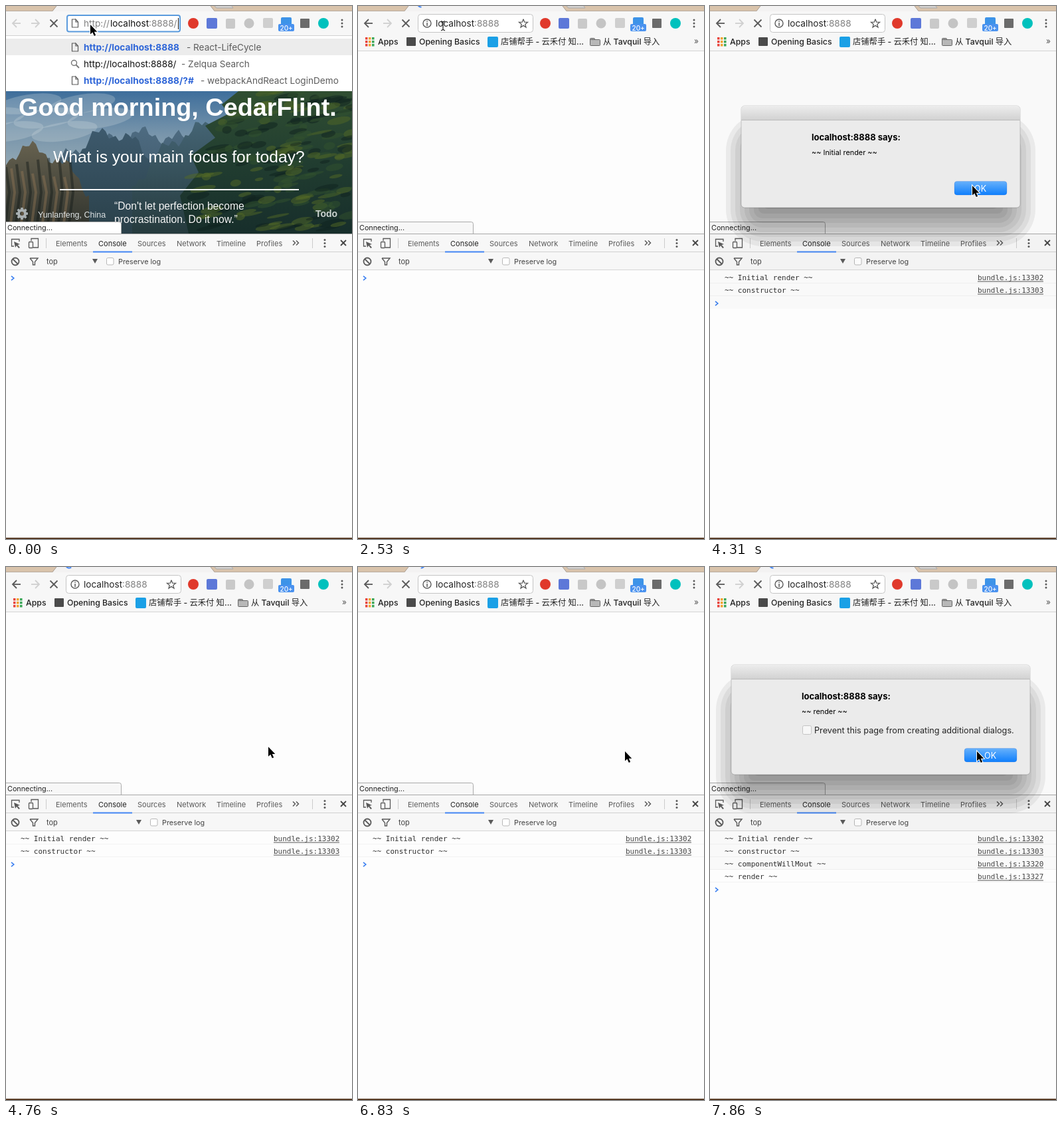
These frames come from a looping animation (521 by 801 pixels, 8000 ms). An HTML page with a canvas:

```html
<!DOCTYPE html>
<html lang="en">
<head>
<meta charset="utf-8">
<title>Lifecycle log</title>
<style>
html, body { margin: 0; width: 100%; height: 100%; overflow: hidden; background: #fdfdfd; }
canvas { display: block; width: 521px; height: 801px; }
</style>
</head>
<body>
<canvas id="stage" width="521" height="801"></canvas>
<script>
const ctx = document.getElementById('stage').getContext('2d');
const LOOP = 8000, STEP = 148.15, LOAD = 2522;
const UI = 'Inter, "Noto Sans CJK SC", "Noto Sans CJK", sans-serif';
const HERO = '"Liberation Sans", Arial, sans-serif';
const MONO = '"DejaVu Sans Mono", monospace';
const GREY = '#5a5a5a', BLUE = '#2f66d8';

const LOGS = [
  ['~~ Initial render ~~', 13302, 2], ['~~ constructor ~~', 13303, 2],
  ['~~ componentWillMout ~~', 13320, 30], ['~~ render ~~', 13327, 35]
];
const ALERTS = [
  { from: 3, to: 14, log: 0 }, { from: 16, to: 28, log: 1 },
  { from: 30, to: 33, log: 2 }, { from: 35, to: 99, log: 3 }
];
// Pointer path: step, x, y
const POINTER = [
  [5, 127, 28], [6, 150, 50], [7, 230, 120], [8, 330, 210], [9, 420, 288],
  [10, 459, 311], [11, 424, 289], [12, 395, 270], [21, 395, 271], [27, 402, 277]
];

function rect(x, y, w, h, fill) { ctx.fillStyle = fill; ctx.fillRect(x, y, w, h); }
function box(x, y, w, h, r, fill, stroke, width = 1) {
  ctx.beginPath();
  ctx.roundRect(x, y, w, h, r);
  if (fill) { ctx.fillStyle = fill; ctx.fill(); }
  if (stroke) { ctx.strokeStyle = stroke; ctx.lineWidth = width; ctx.stroke(); }
}
function dot(x, y, r, fill) { ctx.fillStyle = fill; ctx.beginPath(); ctx.arc(x, y, r, 0, 7); ctx.fill(); }
function ring(x, y, r, stroke, width) {
  ctx.strokeStyle = stroke; ctx.lineWidth = width;
  ctx.beginPath(); ctx.arc(x, y, r, 0, 7); ctx.stroke();
}
function trace(points) {
  ctx.beginPath();
  for (let i = 0; i < points.length; i += 2) ctx.lineTo(points[i], points[i + 1]);
}
function poly(fill, ...points) { trace(points); ctx.fillStyle = fill; ctx.fill(); }
function line(stroke, width, ...points) {
  trace(points); ctx.strokeStyle = stroke; ctx.lineWidth = width; ctx.stroke();
}
function text(str, x, y, size, fill, weight = 400, family = UI) {
  ctx.font = `${weight} ${size}px ${family}`;
  ctx.fillStyle = fill;
  ctx.fillText(str, x, y);
}
function shade(y, h, ...colors) {
  const g = ctx.createLinearGradient(0, y, 0, y + h);
  colors.forEach((c, i) => g.addColorStop(i / (colors.length - 1), c));
  return g;
}
function cross(x, y, r, color) {
  line(color, 1.8, x - r, y - r, x + r, y + r);
  line(color, 1.8, x + r, y - r, x - r, y + r);
}
function menuDots(x, y) { for (const d of [-5, 0, 5]) dot(x, y + d, 1.5, GREY); }
function fileIcon(x, y) {
  line(GREY, 1.2, x + 5.5, y, x, y, x, y + 12, x + 9, y + 12, x + 9, y + 4, x + 5.5, y, x + 5.5, y + 4, x + 9, y + 4);
}
function arrow(x, dir, color) {
  line(color, 1.8, x - 6 * dir, 26, x + 6 * dir, 26);
  line(color, 1.8, x, 20, x + 6 * dir, 26, x, 32);
}

function drawTabs(step) {
  rect(0, 0, 521, 8, '#d9c3ab');
  rect(0, 7, 521, 1, '#b9aca0');
  poly('#f3f2f2', 76, 0, 70, 8, 314, 8, 308, 0);
  line('#a99d92', 1, 76, 0, 70, 7.5);
  line('#a99d92', 1, 308, 0, 314, 7.5);
  poly('#d3d0ce', 314, 0, 317, 3, 342, 3, 340, 0);
  line('#aaa', 1, 314, 0, 317, 3, 342, 3, 340, 0);
  if (step < 0) return;
  const a = (85 + step * 70) * Math.PI / 180;
  ctx.strokeStyle = '#4285f4'; ctx.lineWidth = 2;
  ctx.beginPath(); ctx.arc(95, -4, 5.5, a, a + 2.4); ctx.stroke();
}

function drawToolbar(loaded) {
  rect(0, 8, 521, 36, '#f7f7f7');
  arrow(16, -1, loaded ? GREY : '#d0d0d0');
  arrow(44, 1, '#d0d0d0');
  cross(72, 26, 5.5, GREY);
  dot(282, 26, 8, '#e0392b');
  box(302, 18, 16, 16, 2, '#5d78d8');
  box(331, 19, 14, 15, 2, '#c9c9c9');
  dot(366, 26, 7.5, '#c4c4c4');
  box(387, 18, 15, 15, 2, '#cfcfcf');
  box(414, 17, 16, 12, 2, '#3d93e8');
  box(410, 27, 24, 11, 2, '#4a92ef');
  text('20+', 412.5, 36.5, 10, '#fff', 500);
  box(443, 19, 14, 14, 1, '#6b6b6b');
  dot(478, 26, 8, '#00c1bd');
  menuDots(506, 26);
}

function drawAddress(loaded, caret) {
  if (loaded) {
    box(90.5, 12.5, 173, 27, 4, '#fff', '#c4c4c4');
    ring(104, 26, 6, GREY, 1.4);
    rect(103.3, 25, 1.5, 5, GREY); rect(103.3, 22, 1.5, 1.6, GREY);
    const star = [];
    for (let i = 0; i < 11; i++) {
      const r = i % 2 ? 2.9 : 6.8, a = i * Math.PI / 5 - Math.PI / 2;
      star.push(249 + r * Math.cos(a), 26.5 + r * Math.sin(a));
    }
    line(GREY, 1.3, ...star);
    text('localhost', 117, 31, 13.6, '#222');
    text(':8888', 175, 31, 13.6, '#808080');
    return;
  }
  box(92, 14, 170, 24.5, 3, '#fff', '#5b9bdd', 2);
  fileIcon(99.5, 20);
  text('http://', 117, 31, 13.6, '#808080');
  text('localhost', 157, 31, 13.6, '#111');
  text(':8888/', 215, 31, 13.6, '#808080');
  if (caret) rect(259, 18, 1, 17, '#111');
}

function drawSuggestions() {
  rect(0, 44, 521, 84, '#fff');
  rect(0, 44, 521, 1, '#d2d2d2');
  rect(0, 49, 521, 25, '#ececec');
  fileIcon(99.5, 56);
  ring(102.5, 85.5, 4, '#777', 1.5);
  line('#777', 1.8, 105.5, 88.5, 110, 93);
  fileIcon(99.5, 106);
  text('http://localhost:8888', 117, 67, 13.7, BLUE, 700);
  text('- React-LifeCycle', 272, 67, 13.6, '#5c5c5c');
  text('http://localhost:8888/', 117, 92, 13.6, '#111');
  text('- Zelqua Search', 264, 92, 13.6, '#5c5c5c');
  text('http://localhost:8888/?#', 117, 117, 13.7, BLUE, 700);
  text('- webpackAndReact LoginDemo', 293, 117, 13.6, '#5c5c5c');
}

function ridge(fill, x0, x1, base, height, seed) {
  ctx.beginPath();
  ctx.moveTo(x0, 342);
  for (let x = x0; x <= x1; x += 5) {
    const u = (x - x0) / (x1 - x0);
    const rough = 9 * Math.sin(x * .11 + seed) + 5 * Math.sin(x * .37 + seed * 3);
    ctx.lineTo(x, base - height * Math.sin(Math.PI * u) + rough);
  }
  ctx.lineTo(x1, 342);
  ctx.fillStyle = fill;
  ctx.fill();
}

function drawLandscape() {
  ctx.save();
  ctx.beginPath(); ctx.rect(0, 128, 521, 214); ctx.clip();
  rect(0, 128, 521, 214, shade(128, 130, '#3e6e9b', '#7895ab', '#9eb0b8'));
  for (let i = 0; i < 7; i++) {
    ctx.fillStyle = 'rgba(205,214,218,.28)';
    ctx.beginPath();
    ctx.ellipse(i * 27 - 20, 168 + 24 * Math.sin(i * 2.1), 50, 14, -.15, 0, 7);
    ctx.fill();
  }
  ridge(shade(150, 190, '#527188', '#384f5e'), 40, 380, 255, 62, 1);
  ridge(shade(170, 170, '#3f5c70', '#2a4049'), 75, 240, 262, 72, 2.3);
  ridge(shade(150, 190, '#496a7c', '#263b3e'), 190, 420, 270, 88, 4);
  ridge(shade(205, 137, '#66614f', '#2c302b'), -50, 125, 280, 65, .6);
  for (let i = 0; i < 13; i++) {
    const x = i * 8;
    line(i % 2 ? 'rgba(154,124,88,.4)' : 'rgba(18,26,24,.45)', 4, x, 242 + 15 * Math.sin(i * 3), x + 5, 280, x - 3, 342);
  }
  poly(shade(128, 214, '#304e32', '#213d30', '#172e2b'),
    350, 128, 325, 148, 335, 162, 300, 180, 315, 198, 278, 225, 290, 250, 262, 285, 275, 342, 521, 342, 521, 128);
  let seed = 17;
  const random = () => (seed = seed * 16807 % 2147483647) / 2147483647;
  for (let i = 0; i < 190; i++) {
    const y = 130 + random() * 205, left = Math.max(280, 355 - (y - 128) * .65);
    const x = left + random() * (521 - left);
    ctx.fillStyle = ['rgba(83,105,38,.5)', 'rgba(15,34,30,.5)', 'rgba(50,81,45,.5)'][i % 3];
    ctx.beginPath();
    ctx.ellipse(x, y, 6 + random() * 14, 2 + random() * 4, -.2, 0, 7);
    ctx.fill();
  }
  text('Good morning, CedarFlint.', 19, 165, 37.8, '#fff', 700, HERO);
  text('What is your main focus for today?', 71, 235, 24.6, '#fff', 400, HERO);
  rect(81, 275, 360, 2, '#fff');
  text('“Don\'t let perfection become', 163, 306, 15.7, '#f5f5f5', 400, HERO);
  text('procrastination. Do it now.”', 163, 326, 15.7, '#f5f5f5', 400, HERO);
  text('Yunlanfeng, China', 48, 318, 12.5, '#dde2e3', 400, HERO);
  text('Todo', 466, 317, 14, '#cdd4d1', 700, HERO);
  ring(24, 312, 5, '#a9b0b2', 4);
  for (let i = 0; i < 8; i++) {
    const c = Math.cos(i * Math.PI / 4), s = Math.sin(i * Math.PI / 4);
    line('#a9b0b2', 3.5, 24 + 6 * c, 312 + 6 * s, 24 + 9 * c, 312 + 9 * s);
  }
  ctx.restore();
}

function drawBookmarks() {
  rect(0, 44, 521, 24, '#f7f7f7');
  rect(0, 67, 521, 1, '#d4d4d4');
  const hues = ['#e8453c', '#f0a22e', '#3aa757', '#4285f4'];
  for (let i = 0; i < 9; i++) rect(11 + i % 3 * 5, 47 + Math.floor(i / 3) * 5, 3.5, 3.5, hues[(i + Math.floor(i / 3)) % 4]);
  text('Apps', 30, 58, 12.3, '#222', 500);
  box(73, 47, 14, 13, 1, '#4a4a4a');
  text('Opening Basics', 92, 58, 12.3, '#222', 500);
  box(195, 46, 16, 16, 2, '#1ba0e6');
  text('店铺帮手 - 云禾付 知...', 215, 58, 12.3, '#222', 500);
  box(349.5, 48.5, 7, 4, 1, '#aaa', '#666');
  box(349.5, 50.5, 15, 9, 1, '#b8b8b8', '#666');
  text('从 Tavquil 导入', 369, 58, 12.3, '#222', 500);
  text('»', 506, 57, 12, '#555');
}

function drawStatus(loaded) {
  box(-2.5, 324.5, 176, 20, [0, 3, 0, 0], loaded ? '#f7f7f7' : '#fff', '#a9a9a9');
  text('Connecting...', 2, 337, 10.8, '#222');
}

function drawDevtools(step) {
  const wide = step >= 0 ? 66 : 0;
  rect(0, 342, 521, 459, '#fdfdfd');
  rect(0, 342, 521, 55, '#f7f7f7');
  rect(0, 342, 521, 1, '#a8a8a8');
  rect(0, 369, 521, 1, '#d0d0d0');
  rect(0, 396, 521, 1, '#d6d6d6');
  rect(131, 368.5, 59, 2, '#4285f4');
  line(GREY, 1.3, 12, 361, 8.5, 361, 8.5, 350.5, 20, 350.5, 20, 354);
  poly(GREY, 12, 354, 21, 358, 17.5, 359, 21, 363, 19, 364, 16, 360, 14, 363);
  line(GREY, 1.3, 38, 353, 38, 349.5, 48.5, 349.5, 48.5, 363, 41, 363);
  box(34.5, 354.5, 6, 9, 1, '#f7f7f7', GREY, 1.3);
  rect(60, 349, 1, 15, '#ccc'); rect(461, 349, 1, 15, '#ccc');
  const tabs = { Elements: 75, Console: 139, Sources: 198, Network: 257, Timeline: 317, Profiles: 377 };
  for (const [name, x] of Object.entries(tabs)) text(name, x, 361, 11, name === 'Console' ? '#222' : GREY);
  for (const x of [432, 437]) line(GREY, 1.5, x, 352.5, x + 3.5, 356, x, 359.5);
  menuDots(480, 356.5);
  cross(508, 356, 4, '#444');
  ring(14, 384, 5.5, GREY, 1.8);
  line(GREY, 1.8, 10, 380, 18, 388);
  line(GREY, 1.4, 36, 379, 48, 379, 43.5, 384.5, 43.5, 389, 40.5, 389, 40.5, 384.5, 36, 379);
  text('top', 61, 388, 11, '#444');
  poly(GREY, 130 + wide, 380, 138 + wide, 380, 134 + wide, 387);
  box(151.5 + wide, 378.5, 10.5, 10.5, 2, '#fff', '#b8b8b8');
  text('Preserve log', 169 + wide, 388, 10.8, '#444');

  const shown = LOGS.filter(log => step >= log[2]);
  shown.forEach(([message, row], i) => {
    const y = 412 + i * 19;
    rect(0, y + 4, 521, 1, '#f3f3f3');
    text(message, 22, y, 11, '#303030', 400, MONO);
    text('bundle.js:' + row, 403, y, 11, '#444', 400, MONO);
    rect(403, y + 1.5, 99, 1, '#555');
  });
  const y = 409 + shown.length * 19;
  line('#367cf1', 1.6, 8, y - 3.2, 11.8, y, 8, y + 3.2);
  rect(0, 799, 521, 2, '#5a3d28');
}

function drawAlert({ from, to, log }, step) {
  const first = log === 0;
  const [x, y, w, h] = first ? [47, 150, 420, 153] : [32, 147, 450, 165];
  ctx.save();
  ctx.globalAlpha = step === from ? .6 : 1;
  rect(0, 68, 521, 387, 'rgba(0,0,0,.015)');
  for (let e = 23; e > -36; e -= 7)
    box(x - e, y + 35 - e, w + 2 * e, h + 2 * e, Math.max(8, 32 + e), 'rgba(0,0,0,.06)');
  box(x, y, w, h, 5, '#ebebeb', 'rgba(0,0,0,.22)', .8);
  box(x, y, w, 21, [5, 5, 0, 0], shade(y, 21, '#ededed', '#d2d2d2'));
  rect(x, y + 21, w, 1, '#bcbcbc');
  const dy = first ? 0 : -3, tx = x + 106;
  text('localhost:8888 says:', tx, 202 + dy, 13, '#000', 700);
  text(LOGS[log][0], tx, 224 + dy, 10.9, '#000');
  if (!first) {
    box(139.5, 238.5, 13, 13, 2, '#f7f7f7', '#c4c4c4');
    text('Prevent this page from creating additional dialogs.', 157, 250, 12.7, '#262626');
  }
  const by = first ? 263.5 : 272.5, bx = x + w - (first ? 99 : 99);
  const face = step === to ? ['#4c98f5', '#0a5fdf'] : ['#67b1fb', '#1180fc'];
  box(bx, by, 79, 20.5, 4, shade(by, 20, ...face), 'rgba(20,90,200,.35)', .6);
  text('OK', bx + 30, by + 15, 12.6, '#fff');
  ctx.restore();
}

function drawPointer(step) {
  if (step >= -2 && step < 6) {
    line('#222', 1.3, 125, 22.5, 128, 24, 131, 22.5);
    line('#222', 1.3, 128, 23, 128, 36);
    line('#222', 1.3, 125, 37, 128, 35.5, 131, 37);
    return;
  }
  let [, x, y] = POINTER[0];
  for (let i = 1; i < POINTER.length; i++) {
    const [s0, x0, y0] = POINTER[i - 1], [s1, x1, y1] = POINTER[i];
    if (step < s0) break;
    const u = Math.min(1, (step - s0) / (s1 - s0));
    x = x0 + (x1 - x0) * u;
    y = y0 + (y1 - y0) * u;
  }
  ctx.save();
  ctx.translate(x, y);
  trace([0, 0, 0, 14.5, 3.3, 11.5, 5.8, 17, 8.2, 16, 5.8, 10.7, 10.3, 10.7]);
  ctx.closePath();
  ctx.strokeStyle = '#fff'; ctx.lineWidth = 2; ctx.stroke();
  ctx.fillStyle = '#000'; ctx.fill();
  ctx.restore();
}

function draw(t) {
  const loaded = t >= 2240;
  const step = t >= LOAD ? Math.floor((t - LOAD) / STEP) : loaded ? -2 : -9;
  rect(0, 0, 521, 801, '#fdfdfd');
  drawTabs(step);
  drawToolbar(loaded);
  drawAddress(loaded, t < 600 || (t >= 1200 && t < 1650));
  if (loaded) drawBookmarks();
  else { drawSuggestions(); drawLandscape(); }
  drawStatus(loaded);
  drawDevtools(step);
  const alert = ALERTS.find(a => step >= a.from && step <= a.to);
  if (alert) drawAlert(alert, step);
  drawPointer(step);
}

const start = performance.now();
function tick() {
  draw((performance.now() - start) % LOOP);
  requestAnimationFrame(tick);
}
tick();
</script>
</body>
</html>
```
